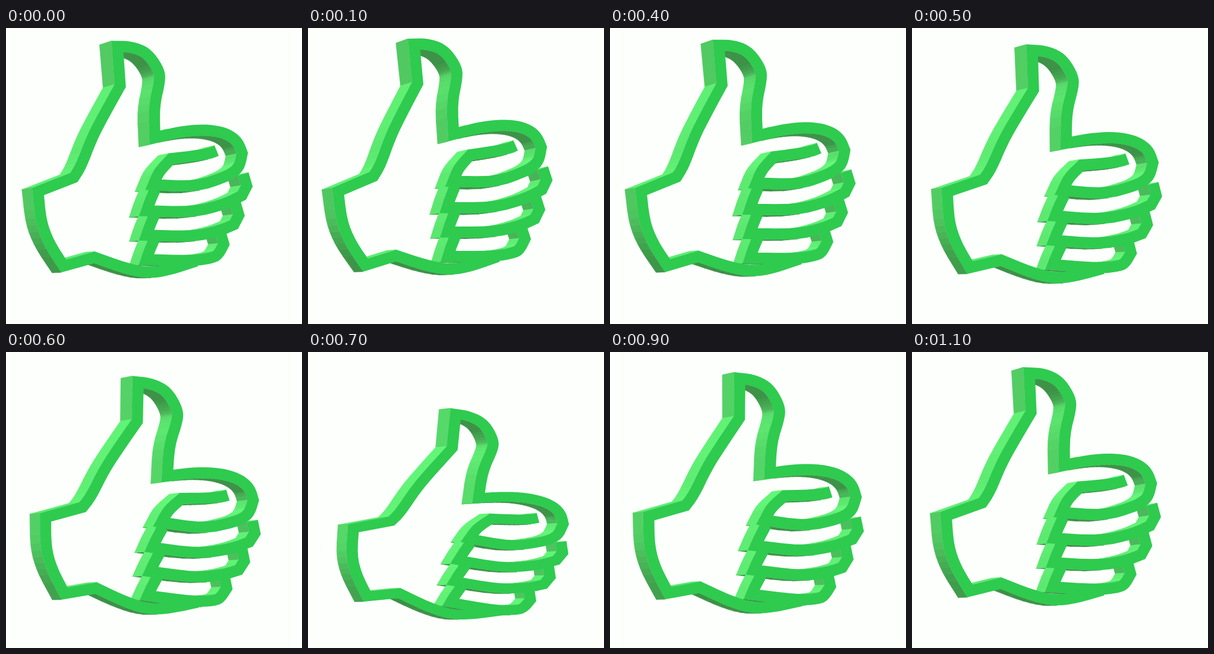
These frames come from a looping animation (498x498 px, 1200 ms). An HTML page with a canvas:

```html
<!DOCTYPE html>
<html lang="en">
<head>
<meta charset="utf-8">
<title>Thumbs up</title>
<style>
  html, body { margin: 0; width: 100%; height: 100%; overflow: hidden; background: #fdfffc; }
  canvas { display: block; width: 100vw; height: 100vh; }
</style>
</head>
<body>
<canvas id="stage" width="498" height="498"></canvas>
<script>
const SIZE = 498, STEP = 100, FRAMES = 12, HALF = 9.4;
const ctx = document.getElementById('stage').getContext('2d');

// Centre line of the hand, from the little finger round to the index fingertip.
const hand = [
  [320, 390], [275, 405], [240, 411], [200, 403], [149, 385],
  [97, 400], [72, 362], [58, 325], [53, 275], [113, 251],
  [125, 232], [143, 184], [162, 147], [190, 96],
  [185, 30], [204, 30], [226, 36], [241, 48], [255, 70], [257, 86], [247, 131], [249, 183],
  [290, 173], [325, 169], [354, 171], [375, 178], [389, 190], [396, 208], [392, 228], [384, 238],
  [368, 248], [318, 265], [247, 262],
  [256, 240], [277, 218], [310, 214], [341, 209], [353, 204]
];

// The other fingers repeat one hook, each lower and shorter than the last.
function finger(i) {
  const base = 265 + 41 * i, knuckle = base - 51 + 8 * i, reach = 405 + 5 * i - 6 * i * i;
  return [
    [250, base - 36], [241, base - 15], [236, base], [313, base + 2],
    [376 - 9 * i, base - 16 + 4 * i],
    [reach - 8, knuckle + 16], [reach, knuckle], [reach - 6, knuckle - 20]
  ];
}

// Round gentle bends by cutting corners; sharp ones stay.
function soften(line) {
  return line.flatMap((p, i) => {
    const a = line[i - 1], b = line[i + 1];
    if (!a || !b) return [p];
    const turn = Math.atan2(b[1] - p[1], b[0] - p[0]) - Math.atan2(p[1] - a[1], p[0] - a[0]);
    if (Math.cos(turn) < Math.cos(.55)) return [p];
    return [a, b].map(q => p.map((v, k) => v + (q[k] - v) * .25));
  });
}

function normal(a, b) {
  const dx = b[0] - a[0], dy = b[1] - a[1], len = Math.hypot(dx, dy);
  return [dy / len, -dx / len];
}

// Widen a line into a closed clockwise band with mitred corners.
function band(line) {
  const side = sign => line.map((p, i) => {
    const m = normal(line[Math.max(0, i - 1)], line[Math.max(1, i)]);
    const n = i < line.length - 1 ? normal(p, line[i + 1]) : m;
    const k = sign * HALF / (1 + m[0] * n[0] + m[1] * n[1]);
    return [p[0] + (m[0] + n[0]) * k, p[1] + (m[1] + n[1]) * k];
  });
  return [...side(1), ...side(-1).reverse()];
}

const bands = [hand, ...[1, 2, 3].map(finger)].map(line => band(soften(soften(line))));

// A quick swing down over four steps, then a slower return over eight.
function swing(frame) {
  const phase = (frame + FRAMES - 3) % FRAMES;
  const level = phase < 4 ? phase / 4 : Math.pow((12 - phase) / 8, 1.2);
  return -.38 + 1.38 * level;
}

function shade(nx, ny) {
  const light = Math.max(.06, -.62 * nx - .72 * ny);
  const tone = (a, b) => Math.round(a + (b - a) * light);
  return `rgb(${tone(56, 100)},${tone(138, 252)},${tone(66, 122)})`;
}

function build(frame) {
  const turn = swing(frame);
  const nod = Math.max(0, (turn - .62) / .38);
  // The hand turns about its heel; past a limit it also tips away.
  const place = ([x, y]) => {
    const px = x + turn * .145 * (415 - y);
    const py = y + turn * .17 * (x - 42);
    return [px + nod * .02 * (430 - py), py + nod * (.135 * (430 - py) - 1)];
  };
  const dx = -18, dy = 4 - 2.5 * turn;
  const push = ([x, y]) => [x + dx * (1 + (200 - y) / 1500), y + dy * (450 - y) / 250];

  const faces = bands.map(b => b.map(place));
  const walls = [];
  for (const face of faces) {
    face.forEach((a, i) => {
      const b = face[(i + 1) % face.length];
      const [nx, ny] = normal(a, b);
      const back = push(a);
      if (nx * (back[0] - a[0]) + ny * (back[1] - a[1]) <= 0) return;
      walls.push({
        quad: [a, b, push(b), back],
        color: shade(nx, ny),
        order: (a[0] + b[0]) * dx + (a[1] + b[1]) * dy
      });
    });
  }
  walls.sort((p, q) => p.order - q.order);
  return { faces, walls };
}
const scenes = Array.from({ length: FRAMES }, (_, i) => build(i));

function fill(points, color) {
  ctx.fillStyle = ctx.strokeStyle = color;
  ctx.beginPath();
  points.forEach(([x, y]) => ctx.lineTo(x, y));
  ctx.closePath();
  ctx.fill();
}

function draw({ faces, walls }) {
  ctx.fillStyle = '#fdfffc';
  ctx.fillRect(0, 0, SIZE, SIZE);
  ctx.lineWidth = .6;
  ctx.lineJoin = 'round';
  for (const { quad, color } of walls) {
    fill(quad, color);
    ctx.stroke();
  }
  for (const face of faces) fill(face, '#2ecb4f');
}

const start = performance.now();
function tick() {
  const t = Math.max(0, performance.now() - start);
  draw(scenes[Math.floor(t / STEP) % FRAMES]);
  requestAnimationFrame(tick);
}
tick();
</script>
</body>
</html>
```
